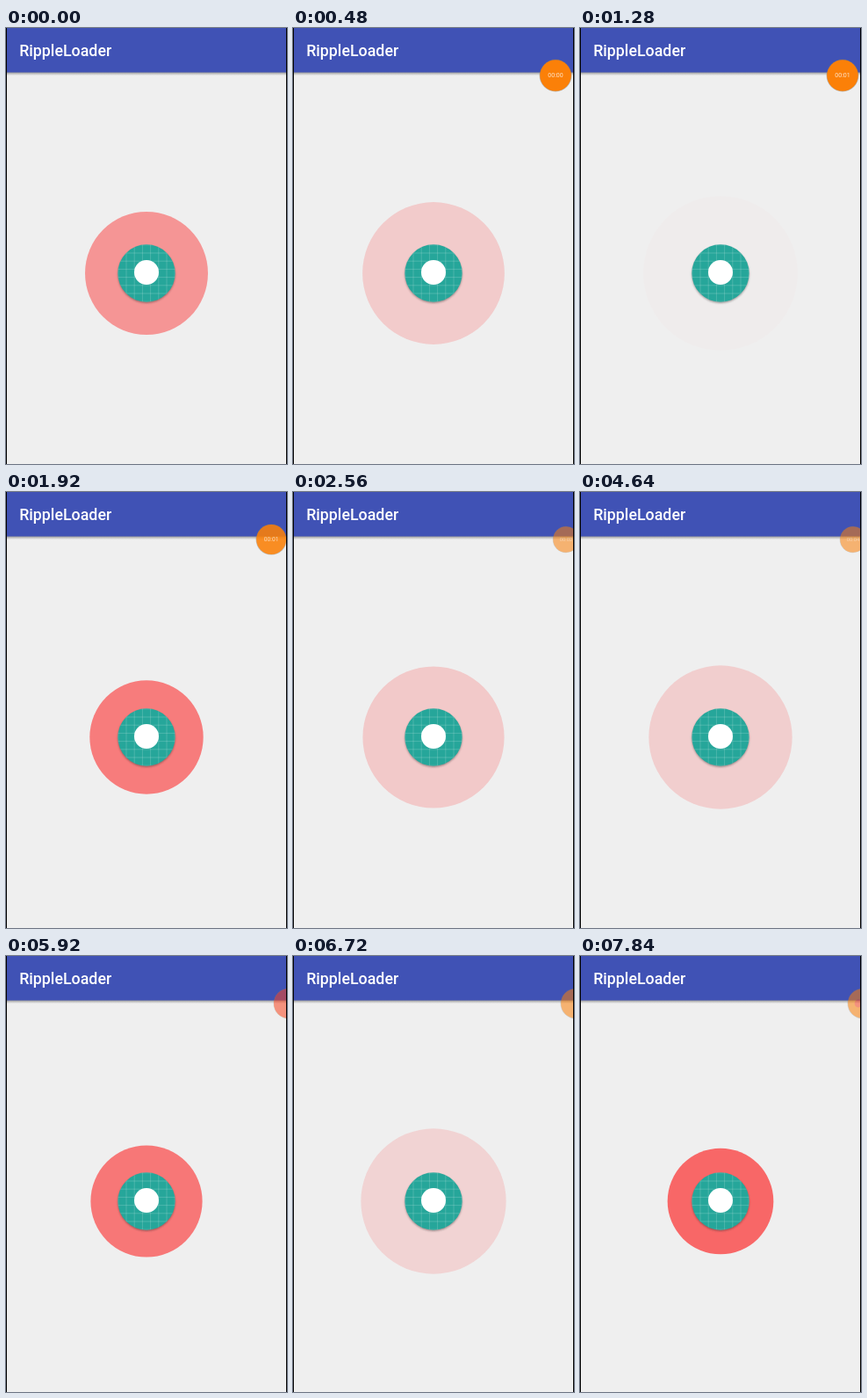
Recreate the animation shown at these times as an HTML page. Size 320 px wide and 496 px high, loop 8000 ms.

```html
<!DOCTYPE html>
<html lang="en">
<head>
<meta charset="utf-8">
<title>RippleLoader</title>
<style>
  html, body { margin: 0; width: 100%; height: 100%; overflow: hidden; background: #efefef; }
  svg { display: block; width: 100%; height: 100%; }
  text { font-family: Roboto, sans-serif; fill: #fff; }
</style>
</head>
<body>
<svg viewBox="0 0 320 496">
  <defs>
    <linearGradient id="shade" x2="0" y2="1">
      <stop offset="0" stop-color="#555" stop-opacity=".6"/>
      <stop offset="1" stop-color="#555" stop-opacity="0"/>
    </linearGradient>
    <filter id="soft" x="-20%" y="-20%" width="140%" height="140%">
      <feGaussianBlur stdDeviation="1"/>
    </filter>
    <clipPath id="disc"><circle cx="160" cy="279" r="32.7"/></clipPath>
  </defs>

  <rect width="320" height="496" fill="#efefef"/>
  <rect y="50" width="320" height="4" fill="url(#shade)"/>
  <rect width="320" height="50.5" fill="#4052b5"/>
  <text x="15.2" y="32" font-size="17.8" font-weight="500">RippleLoader</text>

  <circle id="ripple" cx="160" cy="279" fill="#f00"/>

  <circle cx="160" cy="280.3" r="32.6" fill="#333" opacity=".45" filter="url(#soft)"/>
  <circle cx="160" cy="279" r="32.7" fill="#26a69a"/>
  <path id="grid" clip-path="url(#disc)" stroke="#fff" stroke-opacity=".22" stroke-width=".8"/>
  <circle cx="160" cy="278" r="14" fill="#fff"/>

  <g id="bubble">
    <circle r="18.4" fill="#777" opacity=".5"/>
    <circle r="17.8" fill="#fb8008"/>
    <circle id="pulse" fill="#fa4420"/>
    <text id="timer" y="2.4" font-size="7" text-anchor="middle" opacity=".8"></text>
  </g>

  <path d="M.5 0V496M319.5 0V496" stroke="#000"/>
</svg>
<script>
  const LOOP = 8000, STEP = 160;
  const RIPPLE = 2017, PULSE = 1020;
  const $ = id => document.getElementById(id);
  const clamp = x => Math.min(1, Math.max(0, x));
  const mix = (a, b, k) => a + (b - a) * k;
  const ease = (t, from, to) => {
    const k = clamp((t - from) / (to - from));
    return k * k * (3 - 2 * k);
  };

  let lines = '';
  for (let d = -32.2; d < 33; d += 9.2) {
    lines += `M${160 + d} 246v66M127 ${279 + d}h66`;
  }
  $('grid').setAttribute('d', lines);

  function drawRipple(t) {
    let s = t + 726;
    // short pause before the first restart
    if (s > RIPPLE) s = Math.max(RIPPLE - 1, s - 80);
    const u = s % RIPPLE / RIPPLE;
    const p = 1 - (1 - u) ** 2;
    $('ripple').setAttribute('r', mix(44, 88, p));
    $('ripple').setAttribute('opacity', mix(.9, .01, p));
  }

  function drawBubble(t) {
    const dock = ease(t, 1760, 2240);
    const hide = ease(t, 4960, 5440);
    const x = mix(mix(299, 311, dock), 322, hide);
    const scale = mix(mix(1, .83, dock), .95, hide);
    const phase = t % PULSE / PULSE;
    const grow = dock < 1 ? 0 : clamp((phase - .66) / .1);
    const bubble = $('bubble');
    bubble.setAttribute('transform', `translate(${x} 54) scale(${scale})`);
    bubble.setAttribute('opacity', t < STEP ? 0 : mix(1, .54, dock));
    $('pulse').setAttribute('r', 17.8 * grow);
    $('pulse').setAttribute('cx', -7 * hide * (1 - grow));
    const secs = Math.max(0, Math.floor((t - STEP) / 1000));
    $('timer').textContent = '00:0' + secs;
    $('timer').setAttribute('opacity', mix(.8, .5, dock) * (1 - hide));
  }

  function draw(now) {
    const t = Math.floor(now % LOOP / STEP) * STEP;
    drawRipple(t);
    drawBubble(t);
  }

  const start = performance.now();
  function tick() {
    draw(performance.now() - start);
    requestAnimationFrame(tick);
  }
  tick();
</script>
</body>
</html>
```
